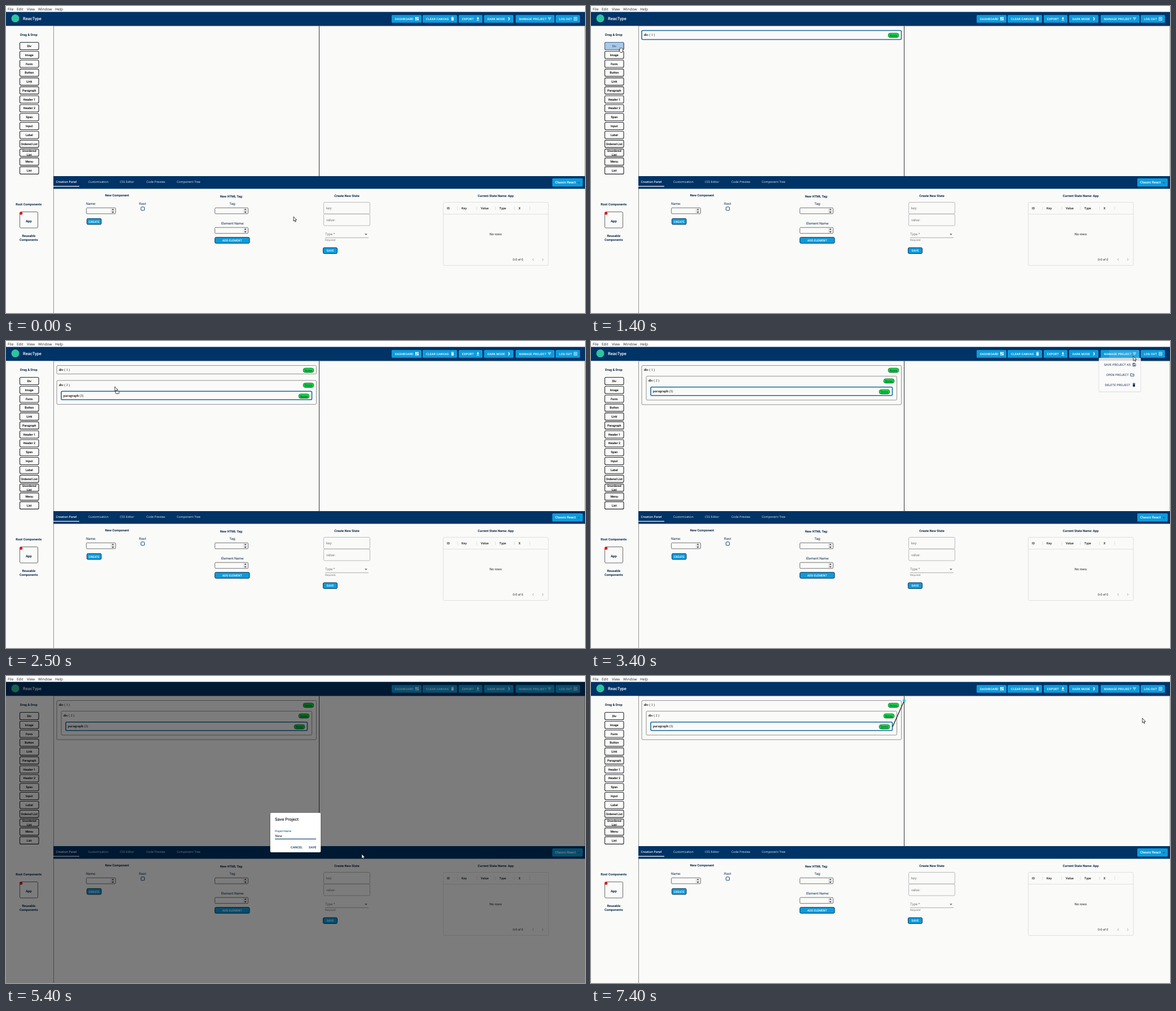
Recreate the animation shown at these times as an HTML page. Size 1027x545 px, loop 7500 ms.

```html
<!DOCTYPE html>
<html lang="en">
<head>
<meta charset="utf-8">
<title>Component builder</title>
<style>
html, body { margin: 0; height: 100%; overflow: hidden; background: #fafaf9; }
svg { display: block; width: 1027px; height: 545px; text-rendering: geometricPrecision; }
text { font-family: Roboto, sans-serif; white-space: pre; }
.ui { font-family: "Open Sans", sans-serif; }
.serif { font-family: "Liberation Serif", serif; }
</style>
</head>
<body>
<svg viewBox="0 0 1027 545"><g id="base"></g><g id="live"></g></svg>
<script>
const NAVY = '#003366', INK = '#0b2a4a', BLUE = '#0d9bdc', SELECTED = '#186ba0';

// Drawing helpers: every one returns SVG markup
const rect = (x, y, w, h, fill, extra = '') =>
  `<rect x="${x}" y="${y}" width="${w}" height="${h}" fill="${fill}" ${extra}/>`;
const box = (x, y, w, h, stroke, width = 1, rx = 2, fill = 'none') =>
  rect(x, y, w, h, fill, `stroke="${stroke}" stroke-width="${width}" rx="${rx}"`);
const line = (d, stroke, width = 1, fill = 'none') =>
  `<path d="${d}" stroke="${stroke}" stroke-width="${width}" fill="${fill}"/>`;
const shape = (d, fill) => `<path d="${d}" fill="${fill}"/>`;
const text = (x, y, str, size, fill = INK, extra = '') =>
  `<text x="${x}" y="${y}" font-size="${size}" fill="${fill}" ${extra}>${str}</text>`;
const MID = 'text-anchor="middle"', BOLD = 'font-weight="700"', MEDIUM = 'font-weight="500"';
const CAPS = MEDIUM + ' letter-spacing=".15"';
const bold = (x, y, str, size = 5.7) => text(x, y, str, size, INK, `${MID} ${BOLD}`);
const at = (x, y, markup, opacity = 1) =>
  `<g transform="translate(${x} ${y})" opacity="${opacity}">${markup}</g>`;

const icons = {
  grid: c => rect(-3, -3, 2.5, 3.3, c) + rect(.3, -3, 2.5, 1.9, c) + rect(-3, 1, 2.5, 1.8, c) + rect(.3, -.4, 2.5, 3.2, c),
  trash: c => shape('M-2.3-3H-1L-.6-3.5H.6L1-3H2.3V-2.2H-2.3ZM-1.9-1.6H1.9V3H-1.9Z', c),
  down: c => shape('M-.9-3H.9V-.8H2.4L0 1.6L-2.4-.8H-.9ZM-2.4 2.2H2.4V3.1H-2.4Z', c),
  moon: c => shape('M-1.6-3A3 3 0 1 1-1.6 3A4 4 0 0 0-1.6-3Z', c),
  filter: c => line('M-3-1.8H3M-2 0H2M-.8 1.8H.8', c, .8),
  exit: c => line('M-2.5-1V-2.6H2.6V2.6H-2.5V1M-3 0H1M-.5-1.4L1 0L-.5 1.4', c, .8),
  save: c => line('M-2.5-2.5H1.5L2.5-1.5V2.5H-2.5ZM-1.6-1.4H.8', c, .8) + rect(-.9, .2, 1.8, 1.5, c),
  folder: c => line('M-3-2H-.6L0-1.2H3V2.2H-3Z', c, .8)
};

const actions = [
  [684, 53, 'DASHBOARD', 729, 'grid'], [739, 61, 'CLEAR CANVAS', 792, 'trash'],
  [803, 42, 'EXPORT', 837, 'down'], [848, 52, 'DARK MODE', 892, 'moon'],
  [904, 69, 'MANAGE PROJECT', 964, 'filter'], [975, 43, 'LOG OUT', 1010, 'exit']
];
const tags = ['Div', 'Image', 'Form', 'Button', 'Link', 'Paragraph', 'Header 1', 'Header 2', 'Span',
  'Input', 'Label', 'Ordered List', 'Unordered|List', 'Menu', 'List'];
const tagY = i => 71 + 15.78 * i;

function tagButton(i, hover) {
  const y = tagY(i), rows = tags[i].split('|');
  return box(24.5, y - 6.5, 33.5, 13, hover ? '#41688c' : '#25272b', 1.1, 2, hover ? '#a9c9e6' : '#fafaf9') +
    rows.map((row, k) => text(41.2, y + 2 + (k - (rows.length - 1) / 2) * 7, row, 5.3,
      hover ? '#406a90' : '#111', `${MID} ${BOLD}`)).join('');
}

const pushButton = (x, y, w, label) => box(x, y, w, 10.5, '#12304a', 1, 2, BLUE) +
  text(x + w / 2, y + 7.2, label, 5.1, '#fff', `${MID} ${MEDIUM} letter-spacing=".1"`);

const numberInput = (x, y, w) => box(x, y, w, 10.5, '#555', .8, 1.5) +
  rect(x + w - 9.5, y + 1, 8.5, 8.6, '#ececec') +
  shape(`M${x + w - 7} ${y + 4}l2-2.3l2 2.3zM${x + w - 7} ${y + 6.8}l2 2.3l2-2.3z`, '#333');

function header() {
  const menu = [[3, 'File'], [19, 'Edit'], [37, 'View'], [57, 'Window'], [87, 'Help']];
  return rect(0, 0, 1027, 10.5, '#fff') +
    menu.map(([x, s]) => text(x, 7.7, s, 6.5, '#222', 'class="ui"')).join('') +
    rect(0, 10.5, 1027, 24.8, NAVY) +
    '<circle cx="16.5" cy="22" r="7" fill="#2cc5a0"/>' +
    text(30, 24.7, 'ReacType', 7.5, '#fff', MEDIUM) +
    actions.map(([x, w, s, ix, icon]) => rect(x, 16, w, 13.7, BLUE, 'rx="1.5"') +
      text(x + 6, 24.8, s, 5.35, '#fff', CAPS) + at(ix, 22.7, icons[icon]('#fff'))).join('');
}

function sidebar() {
  return line('M84.5 35V545', '#777', .8) + bold(40.3, 52.5, 'Drag &amp; Drop') +
    tags.map((_, i) => tagButton(i)).join('') +
    bold(40.3, 354, 'Root Components') +
    box(24.5, 365.5, 32, 28.5, '#444', .8) + '<circle cx="26.7" cy="368" r="2.6" fill="#e8101c"/>' +
    bold(40.3, 384, 'App', 6) + bold(40.3, 410, 'Reusable') + bold(40.3, 417, 'Components');
}

function panel() {
  const tabs = [[146, 'Customization'], [202, 'CSS Editor'], [249, 'Code Preview'], [303, 'Component Tree']];
  const columns = [[782, 'ID', 801], [808, 'Key', 835], [842, 'Value', 868], [875, 'Type', 902], [909, 'X', 929]];
  const gray = '#777';
  return line('M555.5 35V302', '#333') + line('M85 35.6H1027M1026.6 35V302', '#888', .6) +
    rect(84, 302, 943, 22.5, NAVY) +
    text(88.5, 314, 'Creation Panel', 5.25, '#fff', 'class="ui" font-weight="600"') + rect(84, 319.5, 46, 1.2, '#fff') +
    tabs.map(([x, s]) => text(x, 314, s, 5.35, '#e4eaf0', 'class="ui"')).join('') +
    rect(969, 306, 54, 14.5, BLUE, 'rx="1.5"') + text(974, 315.4, 'Classic React', 6, '#fff', MEDIUM) +
    shape('M1014 313h4l-2 2z', '#17507a') +

    bold(197, 337.5, 'New Component') + text(142, 353, 'Name:', 6) + numberInput(142.5, 358.3, 52) +
    text(236, 353, 'Root', 6) + box(239.5, 356.8, 6, 6, '#174a78', 1, .8) + pushButton(143.5, 377.3, 25.5, 'CREATE') +

    bold(400, 339.7, 'New HTML Tag:') + text(402, 353, 'Tag:', 6, INK, MID) + numberInput(370.5, 358.3, 59) +
    text(402, 388, 'Element Name:', 6, INK, MID) + numberInput(370.5, 393.2, 59) +
    pushButton(370.5, 410.7, 61.5, 'ADD ELEMENT') +

    bold(604.5, 338.5, 'Create New State') + box(563.5, 348.5, 82, 20.7, '#aaa', .8) + box(563.5, 369.2, 82, 20.7, '#aaa', .8) +
    text(568, 360.5, 'key:', 6.2, gray) + text(568, 381.5, 'value:', 6.2, gray) +
    text(566, 407.3, 'Type *', 6.2, gray) + shape('M636 404.3h5l-2.5 2.6z', gray) +
    line('M566 411.3H643', '#888', .7) + text(566, 417.3, 'Required', 4.7, gray) + pushButton(562.5, 429, 25, 'SAVE') +

    bold(868.5, 338.5, 'Current State Name: App') + box(775.5, 348.5, 186.5, 112, '#d8d8d8', .8, 2) +
    line('M776 369.5H962', '#d8d8d8', .8) +
    columns.map(([x, s, sep]) => text(x, 361, s, 5.6, '#222', MEDIUM) + line(`M${sep} 356V362`, '#ccc', .6)).join('') +
    text(868.5, 407, 'No rows', 5.8, '#222', MID) + text(899, 452.3, '0-0 of 0', 5.4, '#222') +
    line('M936 448l-2 2.2l2 2.2M951 448l2 2.2l-2 2.2', '#999', .8);
}

document.getElementById('base').innerHTML = header() + sidebar() + panel();

// One element dropped on the canvas
function block(x, y, h, name, id, selected) {
  const right = 640.5 - x;
  return box(x, y, right - x, h, selected ? SELECTED : '#777', selected ? 1.6 : .8) +
    `<text class="serif" x="${x + 3.7}" y="${y + 9.6}" font-size="6" fill="#111"><tspan font-weight="700">${name}</tspan> ${id}</text>` +
    box(right - 23.5, y + 4.6, 19, 7.8, '#126b2c', .8, 4, '#12dc4c') +
    text(right - 14, y + 10.4, 'Notes', 5.3, '#0a3d18', `${MID} text-decoration="underline"`);
}

function blocks(t) {
  if (t < 1100) return '';
  const one = '( 1 )', two = '( 2 )';
  if (t < 1800) return block(90, 43.5, 16, 'div', one, true);
  if (t < 2400) return block(90, 43.5, 15, 'div', one) + block(90, 70, 16, 'div', two, true);
  if (t < 2700) return block(90, 43.5, 15, 'div', one) + block(90, 70, 42.5, 'div', two) +
    block(98, 89.3, 15, 'paragraph', '(3)', true);
  return block(90, 43.5, 69.5, 'div', one) + block(98, 62.4, 42.5, 'div', two) +
    block(106, 81.7, 15, 'paragraph', '(3)', true);
}

function projectMenu() {
  const items = [[910, 44, 'SAVE PROJECT AS', 963.5, 'save'], [914, 62, 'OPEN PROJECT', 960, 'folder'],
    [911.5, 80, 'DELETE PROJECT', 963, 'trash']];
  return rect(919, 16, 53, 13.7, '#fff', 'opacity=".12"') +
    rect(900.5, 30.5, 75, 60.5, '#000', 'opacity=".1" rx="2"') +
    box(901, 30, 74, 60, '#ddd', .6, 2, '#fbfbfb') + rect(901, 30, 74, 5, '#d9dadb') +
    items.map(([x, y, s, ix, icon]) => text(x, y, s, 5.35, INK, 'letter-spacing=".15"') +
      at(ix, y - 2, icons[icon](INK))).join('');
}

function dialog(t) {
  const name = 'New'.slice(0, Math.max(0, Math.floor((t - 4700) / 200)));
  const caret = t < 4900 && t % 1000 < 500;
  return rect(467, 244, 93, 72, '#000', 'opacity=".2" rx="3"') + rect(468.7, 243, 89.6, 70, '#fff', 'rx="2"') +
    text(477, 256.8, 'Save Project', 7.5, '#222', MEDIUM) + text(477, 276.7, 'Project Name', 4.8, NAVY) +
    text(477.3, 285.5, name, 6.3, '#222') + (caret ? rect(477.3, 279, .8, 8, '#222') : '') +
    rect(477, 288.8, 73, 1.1, NAVY) +
    text(505, 305.8, 'CANCEL', 5.35, NAVY, CAPS) + text(537, 305.8, 'SAVE', 5.35, NAVY, CAPS);
}

// Pointer path: time, x, y
const path = [[0, 510, 374], [100, 510, 374], [700, 50, 74], [800, 50, 74], [1100, 190, 80], [1400, 50, 74],
  [1500, 50, 74], [1800, 200, 92], [2000, 46, 149], [2100, 46, 149], [2400, 180, 86], [2500, 193, 81],
  [2700, 200, 51], [3200, 962, 27], [3400, 962, 27], [3600, 946, 43], [4100, 946, 43], [4700, 631, 316],
  [5700, 631, 316], [6300, 543, 303], [6700, 543, 303], [7300, 978, 75], [7500, 978, 75]];
const drags = [[800, 1100], [1500, 1800], [2100, 2400], [2500, 2700]];

function pointer(t) {
  const i = path.findIndex(p => p[0] > t), [t0, x0, y0] = path[i - 1], [t1, x1, y1] = path[i];
  const u = (t - t0) / (t1 - t0), k = u * u * (3 - 2 * u);
  return [x0 + (x1 - x0) * k, y0 + (y1 - y0) * k];
}

function cursor(x, y, hand, drag) {
  const arrow = line('M0 0V8L1.8 6.4L3.1 9.2L4.4 8.6L3.1 5.9H5.6Z', '#111', .8, '#fff');
  const fist = line('M1 5V1.2Q1.5 0 2.2 1Q3-.2 3.8 1Q4.7 0 5.3 1.3Q6.6 1 6.4 2.5V5.5L5.3 8.5H2.2L-.3 5.2Q-.4 3.8 1 5Z', '#111', .8, '#fff');
  return at(x, y, hand ? fist : arrow + (drag ? box(1.5, 8, 6, 4.5, '#222', .9, .8, '#fff') : ''));
}

const ramp = (t, a, b) => Math.min(1, Math.max(0, (t - a) / (b - a)));
const live = document.getElementById('live');

function draw(t) {
  const [x, y] = pointer(t);
  const hover = tags.findIndex((_, i) => x > 24 && x < 58 && Math.abs(y - tagY(i)) < 6.5);
  const drag = drags.some(([a, b]) => t >= a && t < b);
  const fade = ramp(t, 3600, 3900) - ramp(t, 6600, 6900);
  let out = blocks(t);
  if (hover >= 0) out += tagButton(hover, true);
  if (t >= 6900) out += line('M535 90L555.5 44', '#111', 1.2) + '<circle cx="555.5" cy="43.5" r="2.6" fill="#19d3e0"/>';
  if (t >= 3300 && t < 3700) out += projectMenu();
  if (fade > 0) out += rect(0, 10.5, 1027, 534.5, '#000', `opacity="${fade / 2}"`) + at(0, 0, dialog(t), fade);
  live.innerHTML = out + cursor(x, y, hover >= 0, drag);
}

let last = -1;
function tick() {
  const t = Math.floor(performance.now() % 7500 / 100) * 100;
  if (t !== last) draw(last = t);
  requestAnimationFrame(tick);
}
tick();
</script>
</body>
</html>
```
